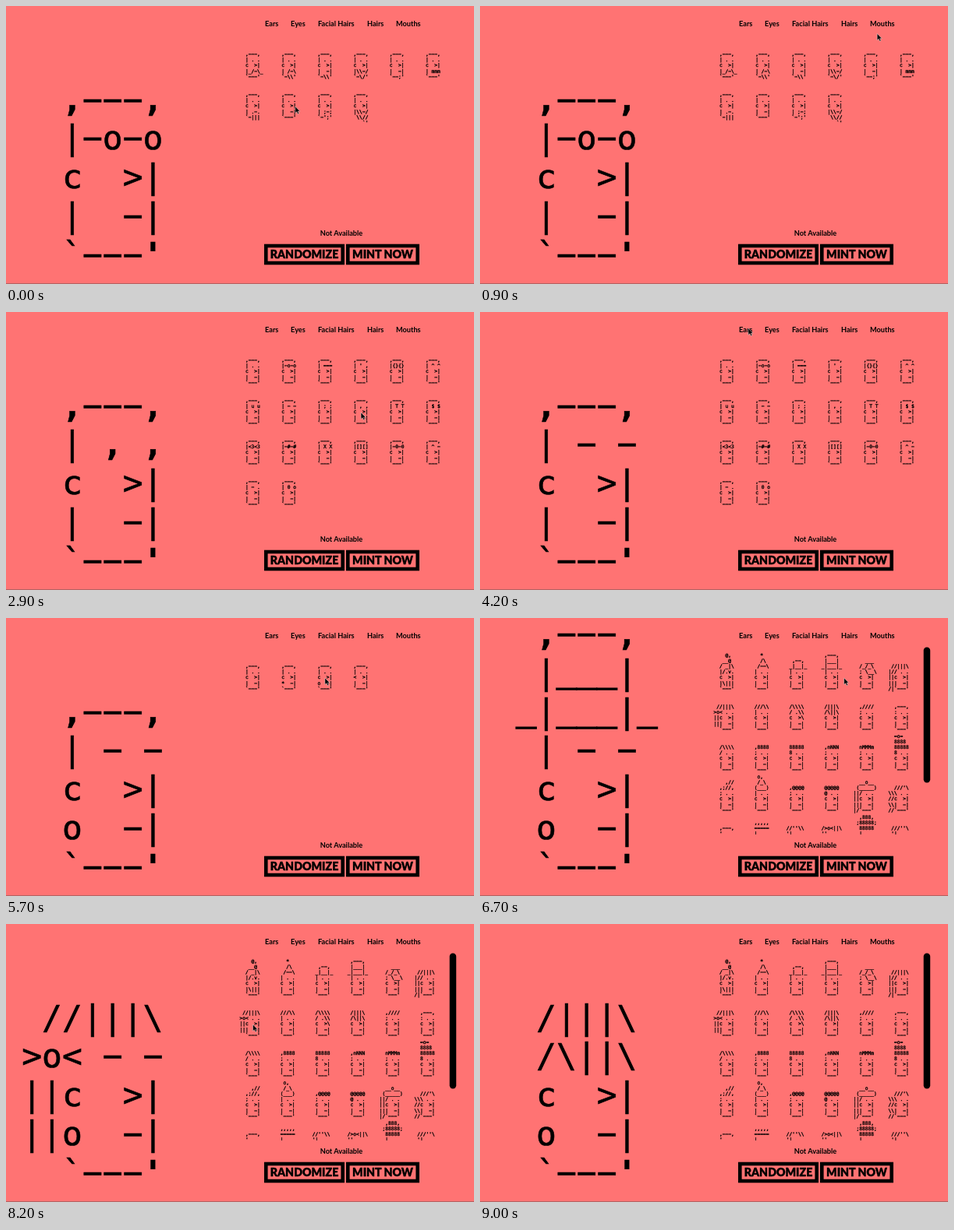
Animation, 600 px wide and 357 px high, one loop 9100 ms. Source, as an HTML page:

```html
<!DOCTYPE html>
<html lang="en">
<head>
<meta charset="utf-8">
<title>ASCII face builder</title>
<style>
html, body { margin: 0; width: 100%; height: 100%; overflow: hidden; background: #ff7373; }
svg { display: block; width: 600px; height: 357px; }
.art text { font: 43px "DejaVu Sans Mono", monospace; white-space: pre; stroke: #000; stroke-width: .6; }
#thumbs text { stroke-width: 2.2; }
#face .rule { stroke-width: 1.6; }
.heavy { font-weight: 700; }
.ui { font: 700 9.2px Lato, sans-serif; }
.button { font: 900 14.2px Lato, sans-serif; text-anchor: middle; stroke: #000; stroke-width: .35; }
</style>
</head>
<body>
<svg viewBox="0 0 600 357">
  <defs><clipPath id="panel"><rect x="290" y="36" width="275" height="242"/></clipPath></defs>
  <rect width="600" height="357" fill="#ff7373"/>
  <rect y="356" width="600" height="1" fill="#b06262"/>
  <g id="face" class="art" transform="translate(72 134.7)"></g>
  <g id="thumbs" class="art" clip-path="url(#panel)"></g>
  <rect id="bar" x="568.7" y="37.5" width="8.5" height="174" rx="4.2"/>
  <g id="tabs" class="ui"></g>
  <text class="ui" x="430" y="295" text-anchor="middle">Not Available</text>
  <g fill="none" stroke="#000" stroke-width="4.6">
    <rect x="333.3" y="308" width="98.4" height="22"/>
    <rect x="438.3" y="308" width="89.4" height="22"/>
  </g>
  <g class="button">
    <text x="382.5" y="324">RANDOMIZE</text>
    <text x="483" y="324">MINT NOW</text>
  </g>
  <path id="cursor" d="M0 0V8.4L2 6.7 3.4 9.8 4.8 9.1 3.5 6.2H6Z" stroke="#fff" stroke-width=".4"/>
</svg>
<script>
const LOOP = 9100, STEP = 100;
const ADVANCE = 25.89, PITCH = 49.75, THUMB = .1455;
const $ = id => document.getElementById(id);

// A part maps a row (0 = top of the head) to characters starting two columns left of it.
const rows = (top, list) => Object.fromEntries(list.map((s, i) => [top + i, s]));
const indent = s => '  ' + s;

const eyes = " . ./-o-o/ ===/ ' ,/{}{}/ ^ ^/ u u/ - -/ ; ;/ , ,/ T T/ $ $/<3<3/-#-#/ X X/[][]/-0-0/ ^ -/ - ./ 0 o"
  .split('/').map(s => rows(1, ['   ' + s]));

const ears = ['c|', 'c*', 'co', '<|'].map(s => rows(2, [...s].map(indent)));

const beards = [
  "|_/-\\_~`---'", "| /-\\~`-\\\\'", "|  -|~`-\\\\'", "|\\\\-/~`-\\/'", "|  -|~`--;'", "| mmm~`---'",
  "| .-.~`-|||", "|  -|~`---'", "| ;-;~`-';'", ":\\\\-/~ \\\\//~   `'"
].map(s => rows(3, s.split('~').map(indent)));

// One hair style per line, rows split by ~; the last head row above the eyes is marked by !.
const hairs = String.raw`
    @,~   __@~! / _|\~  |/.v.~~  |\|||
    *~    /\~!  /--\~  |
   ,--,~! _|__|_~  |
  ,---,~  |___|~!_|___|_~  |
    ___~! /_/_\~  ; \__\
!//|||\~|//~||~||~/|
!//|||\~>o<~||~||
! ///\\~  |
! /\\\\~  /  \\~      \
! /|||\~  /\||\
! ,////~  ;
! ,---,~  :
! /\\\\~  /
! ,8888~  ;
! 88888~  8
! ,nNNN~  ;
! nMMMm~  ;
  =o=~  8888~! 88888~  8
    ,//~! ,;//,~  ;
   o,~   /_\~! (___)~  |
! ,@@@@~  ;
! @@@@@~  @
  __o__~!(_____)~||/~||~||~|/
! ///'\~\\\~//~\\~//
! ,---,~  '
  ,,,,,~! =====
!//''\\~ '
!/>o<||\~ ''
  ,888,~ ;88888;~! 88888
!///''\~ '`.split('\n').slice(1).map(line => {
  const list = line.split('~');
  const top = -list.findIndex(s => s[0] === '!');
  return rows(top, list.map(s => s.replace('!', ' ')));
});

const parts = { beard: beards, eyes, ears, hair: hairs };
const cleared = { beard: [3, 4], hair: [0] };

function compose(pick) {
  const grid = rows(0, ['  ,---,', '  |', '     >|', '  |  -|', "  `---'"]);
  for (const kind in parts) {
    const part = parts[kind][pick[kind]];
    if (!part) continue;
    for (const r of cleared[kind] || []) grid[r] = '';
    for (const r in part) {
      const under = grid[r] || '', over = part[r];
      grid[r] = Array.from({ length: Math.max(under.length, over.length) },
        (_, i) => (over[i] && over[i] !== ' ') ? over[i] : under[i] || ' ').join('');
    }
  }
  return grid;
}

const glyphs = s => s
  .replace(/&/g, '&amp;').replace(/</g, '&lt;').replace(/-/g, '\u2212')
  .replace(/[,']/g, '<tspan class="heavy">$&</tspan>')
  .replace(/_+/g, '<tspan class="rule" baseline-shift="3">$&</tspan>');

const draw = pick => Object.entries(compose(pick))
  .map(([r, s]) => `<text x="${-2 * ADVANCE}" y="${r * PITCH}">${glyphs(s)}</text>`).join('');

// The hair sheet is narrower because of its scroll bar.
const colWidth = kind => kind === 'hair' ? 44.8 : 46.2;
const cellCentre = (kind, i) => [316.5 + i % 6 * colWidth(kind), 77 + Math.floor(i / 6) * 52];

const plain = { beard: 7, eyes: 0, ears: 0, hair: -1 };
const sheets = {};
for (const kind in parts) {
  sheets[kind] = parts[kind].map((_, i) => {
    const [x, y] = cellCentre(kind, i);
    return `<g transform="translate(${x - 9.5} ${y - 13}) scale(${THUMB})">${draw({ ...plain, [kind]: i })}</g>`;
  }).join('');
}

const tabs = {
  ears: ['Ears', 332], eyes: ['Eyes', 365], beard: ['Facial Hairs', 400],
  hair: ['Hairs', 463], mouth: ['Mouths', 500]
};
$('tabs').innerHTML = Object.values(tabs).map(([s, x]) => `<text x="${x}" y="26">${s}</text>`).join('');

// The visit of the cursor: arrival, departure, sheet, cell (none = the tab itself), click
const stop = (at, until, kind, cell, click) => {
  const [x, y] = cell < 0 ? [tabs[kind][1] + 12, 21] : cellCentre(kind, cell);
  return { at, until, kind, cell, click, x, y };
};
const pass = (at, kind, cell) => stop(at, at, kind, cell, false);
const TAB = -1;
const visit = [
  pass(-100, 'beard', 7), pass(450, 'beard', 9), stop(700, 800, 'mouth', TAB, false),
  stop(1100, 1200, 'beard', 4, false),
  stop(1700, 1800, 'eyes', TAB, true), pass(2200, 'eyes', 0), pass(2600, 'eyes', 5),
  pass(2900, 'eyes', 9), stop(3300, 3500, 'eyes', 7, true),
  stop(4200, 4400, 'ears', TAB, true), pass(4700, 'ears', 0), pass(5000, 'ears', 3),
  stop(5500, 5800, 'ears', 2, true),
  stop(6200, 6300, 'hair', TAB, true), pass(6500, 'hair', 3), pass(7000, 'hair', 4),
  pass(7150, 'hair', 2), stop(7350, 7900, 'hair', 9, true),
  pass(8200, 'hair', 6), pass(8500, 'hair', 21), stop(8900, LOOP, 'hair', 17, false)
];

function cursorAt(t) {
  const i = visit.findLastIndex(s => s.at <= t), a = visit[i], b = visit[i + 1];
  if (t <= a.until || !b) return [a.x, a.y];
  const u = (t - a.until) / (b.at - a.until), k = u * u * (3 - 2 * u);
  return [a.x + (b.x - a.x) * k, a.y + (b.y - a.y) * k];
}

const cellAt = (kind, x, y) => parts[kind].findIndex((_, i) => {
  const [cx, cy] = cellCentre(kind, i);
  return Math.abs(x - cx) < 17 && Math.abs(y - cy) < 20;
});

let shownTab, shownFace;
function render(t) {
  let tab = 'beard';
  const pick = { ...plain, eyes: 1 };
  for (const s of visit) {
    if (!s.click || s.at >= t) continue;
    if (s.cell === TAB) tab = s.kind;
    else pick[s.kind] = s.cell;
  }
  const [x, y] = cursorAt(t), away = t >= 9000;
  const hover = away ? -1 : cellAt(tab, x, y);
  if (hover >= 0) pick[tab] = hover;

  if (tab !== shownTab) {
    $('thumbs').innerHTML = sheets[tab];
    $('bar').style.display = tab === 'hair' ? '' : 'none';
    shownTab = tab;
  }
  const face = draw(pick);
  if (face !== shownFace) $('face').innerHTML = shownFace = face;
  $('cursor').setAttribute('transform', `translate(${x.toFixed(1)} ${y.toFixed(1)})`);
  $('cursor').style.display = away ? 'none' : '';
}

const start = performance.now();
function tick() {
  const t = (performance.now() - start) % LOOP;
  render(Math.floor(t / STEP) * STEP);
  requestAnimationFrame(tick);
}
tick();
</script>
</body>
</html>
```
